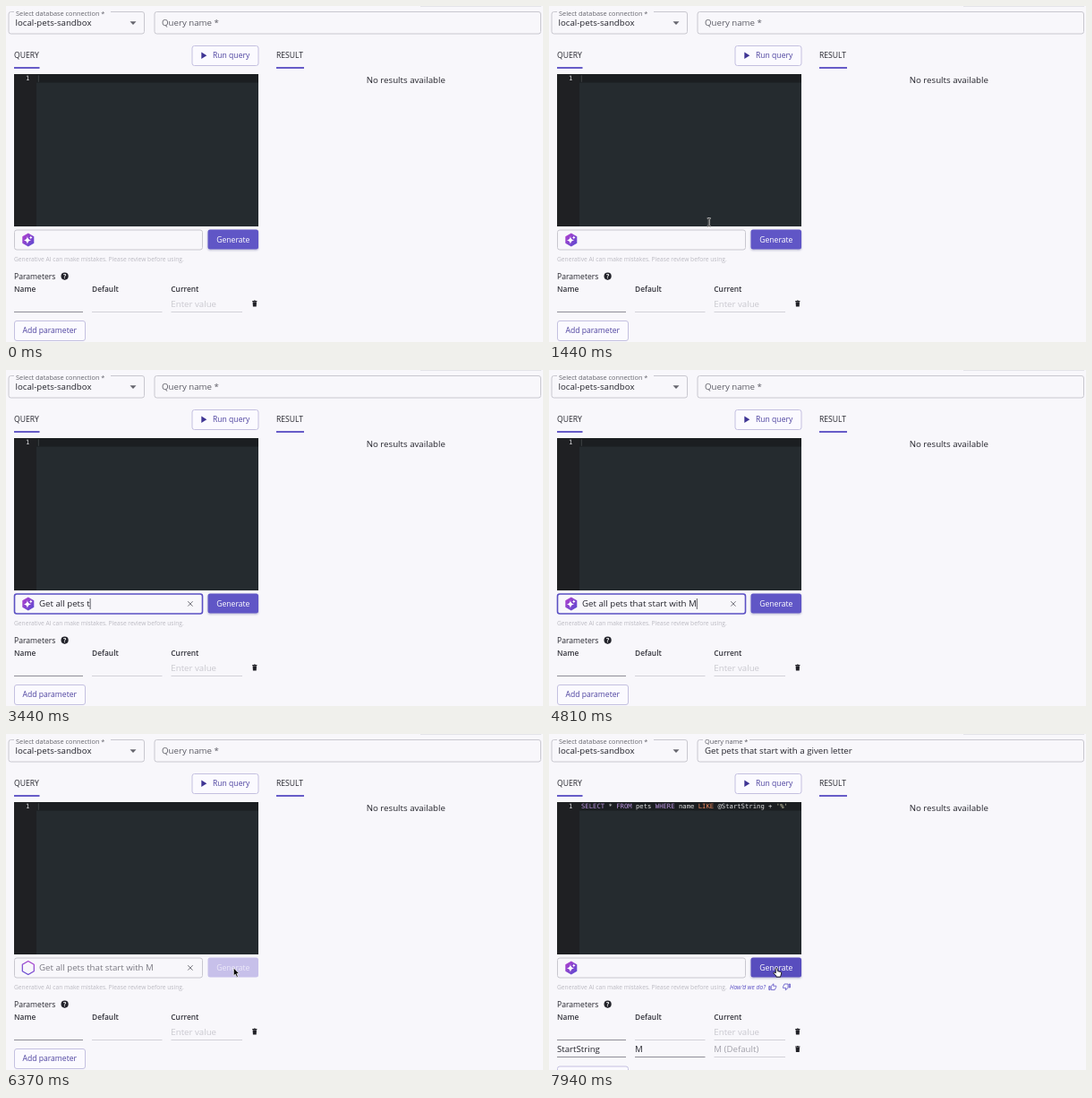
These frames come from a looping animation (600 by 375 pixels, 8 s). An HTML page:

```html
<!DOCTYPE html>
<html lang="en">
<head>
<meta charset="utf-8">
<title>Query builder</title>
<style>
html, body { margin: 0; width: 100%; height: 100%; overflow: hidden; background: #f8f7fb; }
svg { display: block; width: 100vw; height: 100vh; }
text { font: 9.7px 'Open Sans', sans-serif; fill: #25252d; white-space: pre; }
.small { font-size: 7.35px; fill: #66666e; }
.mid { font-size: 8.6px; font-weight: 500; }
.head { font-size: 8.4px; font-weight: 600; fill: #33333b; }
.hint { font-size: 6.67px; fill: #bbbac2; }
.mono { font: 7.24px 'DejaVu Sans Mono', monospace; fill: #dedee0; }
.kw { fill: #b993dc; }
.op { fill: #ec8a60; }
.link { fill: #4d429f; }
.pale { fill: #c9c8cf; }
.box { fill: none; stroke: #c8c7cf; }
.btn { fill: #fbfaff; stroke: #c4c0e0; }
.line { stroke: #d2d1d8; }
.dark { stroke: #8f8e97; }
</style>
</head>
<body>
<svg viewBox="0 0 600 375" preserveAspectRatio="none">
  <defs>
    <linearGradient id="hue" x1="0" y1="0" x2="1" y2="1">
      <stop offset="0" stop-color="#b53fce"/>
      <stop offset="1" stop-color="#564bd0"/>
    </linearGradient>
    <filter id="shade" x="-20%" y="-30%" width="140%" height="180%">
      <feDropShadow dx="0" dy="1" stdDeviation="1" flood-color="#221a60" flood-opacity=".3"/>
    </filter>
    <path id="hex" d="M0 -7.5L6.5 -3.75V3.75L0 7.5L-6.5 3.75V-3.75Z" stroke-linejoin="round"/>
    <path id="thumb" d="M8 20h10l4-8V9h-8l1-6-7 6zM2 10h3v10H2z"
      fill="none" stroke="#5b50c4" stroke-width="2" stroke-linejoin="round"/>
    <path id="bin" d="M-2.2 -2h4.4l-.3 5.2h-3.8zM-2.6 -3.2h1.6l.4-.5h1.2l.4.5h1.6v.8h-5.2z" fill="#202026"/>
  </defs>
  <rect width="600" height="375" fill="#f8f7fb"/>
  <path d="M463 0H598" class="line"/>

  <rect x="3" y="6.5" width="151.5" height="24.5" rx="2.5" class="box"/>
  <rect x="9" y="5" width="108" height="3" fill="#f8f7fb"/>
  <text x="11" y="11.3" class="small">Select database connection *</text>
  <text x="10.5" y="22.3">local-pets-sandbox</text>
  <path d="M138.5 17.3h7l-3.5 3.6z" fill="#66666e"/>

  <rect x="166" y="6.5" width="431.5" height="24.5" rx="2.5" class="box"/>
  <rect id="gap" x="172" y="5" height="3" fill="#f8f7fb"/>
  <text id="label" fill="#5c5c65" style="fill:#5c5c65">Query name *</text>
  <text id="title" x="174" y="22.3">Get pets that start with a given letter</text>

  <text x="9" y="58.3" class="mid">QUERY</text>
  <text x="302" y="58.3" class="mid">RESULT</text>
  <path d="M9 69H37.5M302 69H333" stroke="#675cc8" stroke-width="1.8"/>
  <rect x="208" y="44.5" width="74" height="22" rx="2.5" class="btn"/>
  <path d="M218.3 51.6v7.4l6-3.7z" fill="#3f3594"/>
  <text x="231" y="58.4" class="mid link">Run query</text>
  <text x="402.7" y="86.3">No results available</text>

  <rect x="9" y="76" width="273" height="170" fill="#252b2f"/>
  <rect x="9" y="76" width="25" height="170" fill="#1f2023"/>
  <rect x="34" y="76" width="248" height="9.5" fill="#1b1e21"/>
  <text x="22" y="83.2" class="mono">1</text>
  <path id="edCaret" d="M36.3 77.3V84.8" stroke="#4a4c50" stroke-width=".8"/>
  <text id="sql" x="36" y="83.2" class="mono"><tspan class="kw">SELECT</tspan> * <tspan class="kw">FROM</tspan> pets <tspan class="kw">WHERE</tspan> name <tspan class="op">LIKE</tspan> @StartString + <tspan fill="#d8d5b4">'%'</tspan></text>

  <rect id="prompt" x="9.5" y="250" width="210" height="22" rx="2.5" class="box"/>
  <g transform="translate(24.8 261)">
    <g id="spark">
      <use href="#hex" fill="url(#hue)"/>
      <path d="M-.9 -4Q-.5 -.1 3.3 .4Q-.5 .9 -.9 4.8Q-1.3 .9 -5 .4Q-1.3 -.1 -.9 -4ZM3 -4.4Q3.2 -2.7 4.8 -2.5Q3.2 -2.3 3 -.6Q2.8 -2.3 1.2 -2.5Q2.8 -2.7 3 -4.4Z" fill="#fff"/>
    </g>
    <use id="busy" href="#hex" fill="none" stroke="url(#hue)" stroke-width="1.2"/>
  </g>
  <text id="typed" x="37" y="264.4"></text>
  <path id="caret" d="M0 255V267" stroke="#33333b" stroke-width=".8"/>
  <path id="clear" d="M203.2 258.2l5.4 5.4M208.6 258.2l-5.4 5.4" stroke="#74747d" stroke-width="1"/>

  <rect id="gen" x="225.5" y="249.5" width="56.5" height="22" rx="2.5"/>
  <text id="genText" x="253.8" y="263.6" class="mid" text-anchor="middle">Generate</text>

  <text x="9" y="285" class="hint">Generative AI can make mistakes. Please review before using.</text>
  <g id="vote">
    <text x="202" y="285" class="hint" style="fill:#5b50c4;font-style:italic;font-weight:500">How'd we do?</text>
    <use href="#thumb" transform="translate(245 277.6) scale(.4)"/>
    <use href="#thumb" transform="translate(270.3 287) scale(-.4)"/>
  </g>

  <text x="9" y="304.8" class="mid">Parameters</text>
  <circle cx="65.6" cy="301.6" r="4.1" fill="#22222a"/>
  <text x="65.6" y="304.2" text-anchor="middle" style="fill:#fff;font-size:7px;font-weight:700">?</text>
  <text x="9" y="319.2" class="head">Name</text>
  <text x="96" y="319.2" class="head">Default</text>
  <text x="184.3" y="319.2" class="head">Current</text>
  <path d="M96 341.5H174.5M184.5 341.5H264" class="line"/>
  <path d="M9 341.5H86" class="dark"/>
  <text x="184.3" y="335.6" class="pale">Enter value</text>
  <use href="#bin" x="277.8" y="332.3"/>
  <g id="row">
    <text x="9" y="355">StartString</text>
    <text x="96" y="355">M</text>
    <text x="184.3" y="355" style="fill:#a2a1aa">M (Default)</text>
    <path d="M9 360.5H86M96 360.5H174.5" class="dark"/>
    <path d="M184.5 360.5H264" class="line"/>
    <use href="#bin" x="277.8" y="351.8"/>
  </g>
  <g id="add">
    <rect x="9.5" y="351.5" width="79" height="22" rx="2.5" class="btn"/>
    <text x="18.5" y="365.4" class="mid link">Add parameter</text>
  </g>

  <g id="pointer">
    <path id="arrow" d="M0 0V8.9L2 7.1l1.5 3.3 1.5-.7L3.6 6.5H6.3Z" fill="#000" stroke="#fff" stroke-width=".7"/>
    <path id="hand" d="M-1 .8q1-1.5 2 0v2.8l3.6.9q.9.3.8 1.3l-.5 2.4-.5.9v1h-4.8v-1l-2.9-3q-.4-.9.5-1.1.7 0 1.8.9z" fill="#fff" stroke="#111" stroke-width=".9"/>
    <g id="beam" fill="none">
      <path d="M-2 -4.5Q0 -4.5 0 -3.5Q0 -4.5 2 -4.5M0 -3.5V3.5M-2 4.5Q0 4.5 0 3.5Q0 4.5 2 4.5" stroke="#fff" stroke-width="1.8"/>
      <path d="M-2 -4.5Q0 -4.5 0 -3.5Q0 -4.5 2 -4.5M0 -3.5V3.5M-2 4.5Q0 4.5 0 3.5Q0 4.5 2 4.5" stroke="#111" stroke-width=".9"/>
    </g>
  </g>
</svg>
<script>
const LOOP = 8000, FOCUS = 1840, TYPE = 2690, TYPED = 4310;
const MOVE = 4830, CLICK = 5750, SEND = 5850, DONE = 7560;
const PROMPT = 'Get all pets that start with M';
const PATH = [
  [620, 600, -10], [870, 295, 171], [1150, 232, 209], [1500, 168, 248],
  [1700, 154, 257], [MOVE, 154, 257], [5150, 195, 259], [5450, 254.3, 261]
];
const el = {};
document.querySelectorAll('[id]').forEach(n => el[n.id] = n);

const clamp = v => Math.max(0, Math.min(1, v));
const ease = v => v * v * (3 - 2 * v);
const fade = (t, start, ms) => ease(clamp((t - start) / ms));
const lerp = (a, b, p) => a + (b - a) * p;
const mix = (a, b, p) => `rgb(${a.map((v, i) => Math.round(lerp(v, b[i], p)))})`;
const show = (node, on) => node.style.display = on ? '' : 'none';
const inside = (p, x, y, w, h) => p.x >= x && p.x <= x + w && p.y >= y && p.y <= y + h;

function pointAt(t) {
  const last = PATH[PATH.length - 1];
  for (let i = 1; i < PATH.length; i++) {
    const [t0, x0, y0] = PATH[i - 1], [t1, x1, y1] = PATH[i];
    if (t < t1) {
      const p = clamp((t - t0) / (t1 - t0));
      return { x: lerp(x0, x1, p), y: lerp(y0, y1, p) };
    }
  }
  return { x: last[1], y: last[2] };
}

function cursorKind(p, t, filled) {
  const sending = t >= SEND + 100 && t < DONE + 60;
  if (inside(p, 225.5, 249.5, 56.5, 22)) return sending ? 'arrow' : 'hand';
  if (filled && inside(p, 200, 255, 12, 12)) return 'hand';
  if (inside(p, 9, 249.5, 210, 22) || inside(p, 9, 76, 273, 170)) return 'beam';
  return 'arrow';
}

function drawPointer(t, filled) {
  const p = pointAt(t), kind = cursorKind(p, t, filled);
  show(el.pointer, t >= 620 && (t < TYPE || t >= MOVE));
  el.pointer.setAttribute('transform', `translate(${p.x} ${p.y})`);
  for (const k of ['arrow', 'hand', 'beam']) show(el[k], k === kind);
}

function drawPrompt(t, busy, done) {
  const step = (TYPED - TYPE) / (PROMPT.length - 1);
  const count = t < TYPE || done ? 0 : Math.min(PROMPT.length, 1 + Math.floor((t - TYPE) / step));
  const focus = t >= FOCUS && t < CLICK;
  const since = t < TYPE ? t - FOCUS : Math.max(0, t - TYPED);
  el.typed.textContent = PROMPT.slice(0, count);
  el.typed.style.fill = busy ? '#7b7a83' : '#25252d';
  el.prompt.style.stroke = focus ? '#5b50c4' : '#c8c7cf';
  el.prompt.style.strokeWidth = focus ? 1.6 : 1;
  show(el.clear, count > 0);
  show(el.caret, focus && since % 1060 < 530);
  const end = count ? el.typed.getComputedTextLength() : 0;
  el.caret.setAttribute('transform', `translate(${37.5 + end} 0)`);
  return count > 0;
}

function draw(t) {
  const done = t >= DONE, busy = t >= SEND && !done;
  const filled = drawPrompt(t, busy, done);

  show(el.spark, !busy);
  show(el.busy, busy);
  el.hue.setAttribute('gradientTransform', `rotate(${busy ? (t - 7190) * .36 : 0} .5 .5)`);

  const off = fade(t, SEND, 250) - fade(t, DONE, 250);
  const hover = fade(t, 5300, 250);
  const base = [97, 87, 198].map((v, i) => lerp(v, [88, 77, 190][i], hover));
  el.gen.setAttribute('fill', mix(base, [199, 192, 234], off));
  el.gen.setAttribute('filter', off < .5 ? 'url(#shade)' : 'none');
  el.genText.style.fill = mix([255, 255, 255], [236, 232, 249], off);

  const up = fade(t, DONE, 200);
  el.label.setAttribute('transform',
    `translate(174 ${lerp(22.3, 11.3, up)}) scale(${lerp(1, .757, up)})`);
  el.gap.setAttribute('width', 52 * up);
  for (const id of ['title', 'sql', 'vote', 'row']) show(el[id], done);
  show(el.edCaret, !done);
  el.add.setAttribute('transform', `translate(0 ${done ? 19.5 : 0})`);

  drawPointer(t, filled);
}

const begin = performance.now();
function tick() {
  draw((performance.now() - begin) % LOOP);
  requestAnimationFrame(tick);
}
tick();
</script>
</body>
</html>
```
